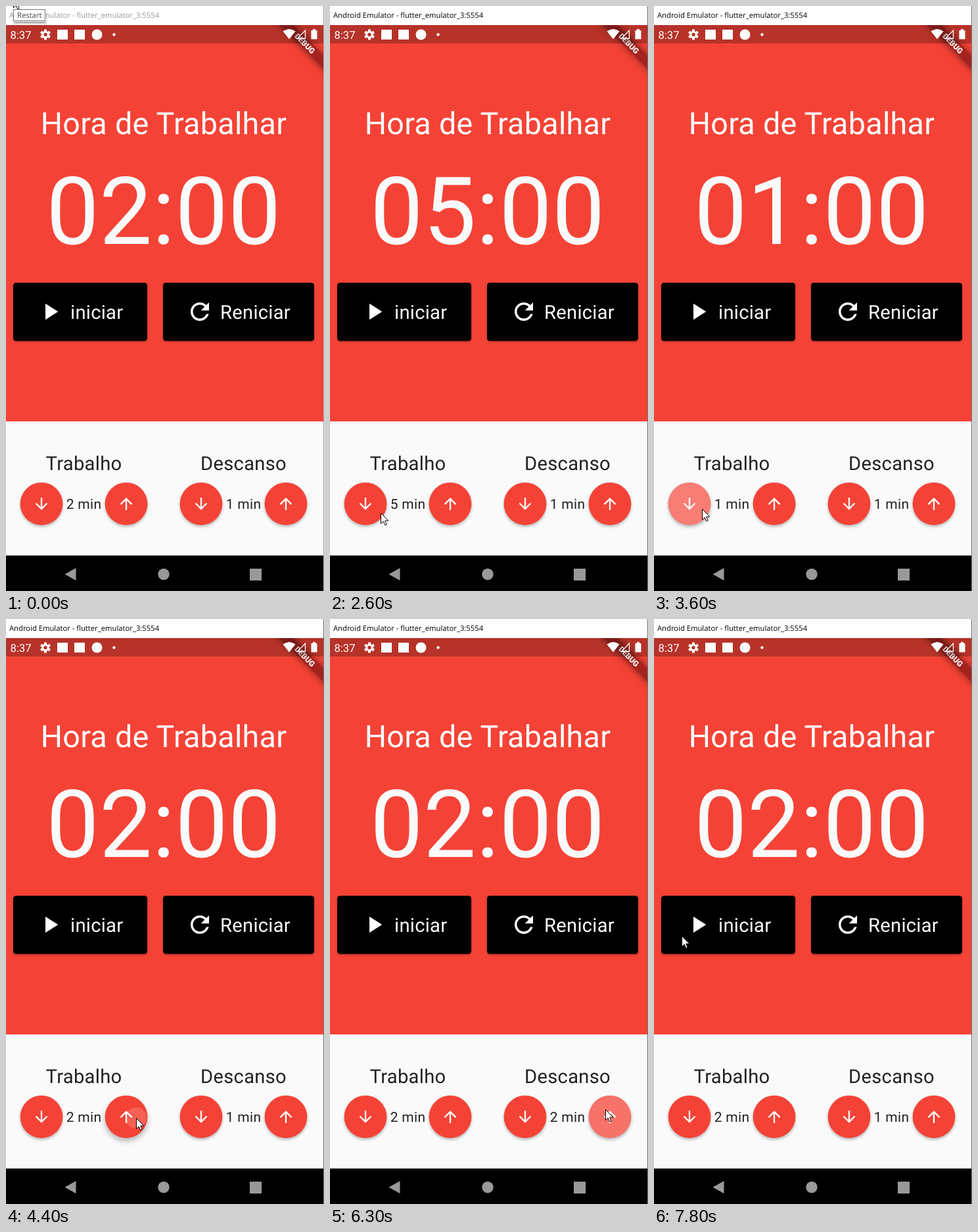
Animation of 484 by 890 pixels, one loop 8 s. Source, as an HTML page with a canvas:

```html
<!DOCTYPE html>
<html lang="pt">
<head>
<meta charset="utf-8">
<title>Timer</title>
<style>
html, body { margin: 0; width: 100%; height: 100%; overflow: hidden; background: #fff; }
canvas { display: block; width: 484px; height: 890px; }
</style>
</head>
<body>
<canvas id="stage" width="484" height="890"></canvas>
<script>
const ctx = document.getElementById('stage').getContext('2d');
const LOOP = 8000, STEP = 100;
const RED = '#f44336', INK = '#212121';
const UI = '"Open Sans", sans-serif', APP = 'Roboto, sans-serif';
const TRACK = .29;

const ICON = {
  play: new Path2D('M8 5v14l11-7z'),
  refresh: new Path2D('M17.65 6.35C16.2 4.9 14.21 4 12 4c-4.42 0-7.99 3.58-7.99 8s3.57 8 7.99 8c3.73 0 6.84-2.55 7.73-6h-2.08c-.82 2.33-3.04 4-5.65 4-3.31 0-6-2.69-6-6s2.69-6 6-6c1.66 0 3.14.69 4.22 1.78L13 11h7V4l-2.35 2.35z'),
  down: new Path2D('M20 12l-1.41-1.41L13 16.17V4h-2v12.17l-5.58-5.59L4 12l8 8 8-8z'),
  up: new Path2D('M4 12l1.41 1.41L11 7.83V20h2V7.83l5.58 5.59L20 12l-8-8-8 8z'),
  arrow: new Path2D('M.5.5V16.6L4.2 13.1L6.8 18.8L9.2 17.8L6.7 12.1H11.8Z')
};

// Round buttons: centre x, value they change, direction
const FABS = [
  { x: 54, key: 'work', dir: -1 }, { x: 183, key: 'work', dir: 1 },
  { x: 297, key: 'rest', dir: -1 }, { x: 426, key: 'rest', dir: 1 }
];
const FAB_Y = 757.3, FAB_R = 32.4;

// [time, button index]
const PRESSES = [
  [1900, 1], [2100, 1], [2300, 1], [3000, 0], [3200, 0], [3400, 0], [3500, 0],
  [4400, 1], [6200, 3], [6700, 3], [7000, 2], [7200, 2]
];
// Splash opacity and elevation by steps since the press
const SPLASH = [.16, .25, .08];
const LIFT = [12, 7, 6];

// Pointer path: [time, x, y]
const PATH = [
  [0, 11, -14], [800, 204, 779], [900, 193, 755], [1200, 184, 755], [2300, 184, 755],
  [2600, 77, 771], [2800, 73, 765], [3800, 73, 765], [4100, 198, 759], [4700, 198, 759],
  [5200, 308, 765], [5400, 428, 758], [5500, 428, 758], [6200, 419, 746], [6700, 419, 746],
  [7000, 317, 772], [7500, 317, 772], [7600, 308, 770], [7700, 308, 770], [7800, 42, 482]
];

function pointerAt(t) {
  const i = PATH.findIndex(p => p[0] > t);
  if (i < 0) return PATH[PATH.length - 1].slice(1);
  const [t0, x0, y0] = PATH[i - 1], [t1, x1, y1] = PATH[i];
  const k = (t - t0) / (t1 - t0);
  return [Math.round(x0 + (x1 - x0) * k), Math.round(y0 + (y1 - y0) * k)];
}

function rect(x, y, w, h, color) {
  ctx.fillStyle = color;
  ctx.fillRect(x, y, w, h);
}

function disc(x, y, r, color) {
  ctx.fillStyle = color;
  ctx.beginPath();
  ctx.arc(x, y, r, 0, 7);
  ctx.fill();
}

function poly(points, color) {
  ctx.fillStyle = color;
  ctx.beginPath();
  points.forEach(p => ctx.lineTo(p[0], p[1]));
  ctx.closePath();
  ctx.fill();
}

function text(str, x, y, font, color, align = 'left', spacing = 0) {
  ctx.font = font;
  ctx.textRendering = 'geometricPrecision';
  ctx.fillStyle = color;
  ctx.textAlign = align;
  ctx.letterSpacing = spacing + 'px';
  ctx.fillText(str, x, y);
}

function icon(path, x, y, scale, color) {
  ctx.save();
  ctx.translate(x, y);
  ctx.scale(scale, scale);
  ctx.fillStyle = color;
  ctx.fill(path);
  ctx.restore();
}

function withShadow(alpha, blur, dy, draw) {
  ctx.save();
  ctx.shadowColor = `rgba(0,0,0,${alpha})`;
  ctx.shadowBlur = blur;
  ctx.shadowOffsetY = dy;
  draw();
  ctx.restore();
}

function titleBar(active) {
  rect(0, 0, 484, 29, '#fff');
  text('Android Emulator - flutter_emulator_3:5554', 5, 18, '11.25px ' + UI, active ? '#000' : '#999');
}

function banner() {
  ctx.save();
  ctx.beginPath();
  ctx.rect(0, 29, 484, 603);
  ctx.clip();
  ctx.translate(483, 29);
  ctx.rotate(Math.PI / 4);
  withShadow(.5, 12, 0, () => rect(-60, 32.7, 120, 14, '#a02a23'));
  rect(-60, 32.7, 120, 14, '#a5231f');
  text('DEBUG', 0, 44, '900 11.9px ' + APP, '#fff', 'center');
  ctx.restore();
}

function gear(x, y) {
  disc(x, y, 5.8, '#fff');
  for (let i = 0; i < 6; i++) {
    ctx.save();
    ctx.translate(x, y);
    ctx.rotate(i * Math.PI / 3);
    rect(-2, -8, 4, 4, '#fff');
    ctx.restore();
  }
  disc(x, y, 2.7, '#b73228');
}

function statusBar() {
  rect(0, 29, 484, 28, 'rgba(0,0,0,.25)');
  text('8:37', 6.5, 49.5, '16.6px ' + APP, '#fff');
  gear(60, 43.5);
  rect(78, 36, 16, 15, '#fff');
  rect(104, 36, 16, 15, '#fff');
  disc(138.5, 43.5, 8, '#fff');
  disc(164.5, 43.5, 2.2, '#fff');

  ctx.fillStyle = '#fff';
  ctx.beginPath();
  ctx.moveTo(431, 50.5);
  ctx.lineTo(421.5, 38.5);
  ctx.quadraticCurveTo(431, 31.5, 440.5, 38.5);
  ctx.fill();

  ctx.strokeStyle = '#fff';
  ctx.lineWidth = 1.3;
  ctx.beginPath();
  ctx.moveTo(455.5, 37);
  ctx.lineTo(455.5, 49.5);
  ctx.lineTo(443.5, 49.5);
  ctx.closePath();
  ctx.stroke();

  rect(464.5, 37, 9, 13.5, '#fff');
  rect(467, 35, 4, 3, '#fff');
}

function blackButton(x, w, path, iconX, label, labelX) {
  withShadow(.3, 3, 1.5, () => {
    ctx.fillStyle = '#000';
    ctx.beginPath();
    ctx.roundRect(x, 421, w, 88.5, 4.5);
    ctx.fill();
  });
  icon(path, iconX, 444, 1.75, '#fff');
  text(label, labelX, 475.5, '29.17px ' + APP, '#fff', 'left', TRACK);
}

function fab(index, t) {
  const { x, dir } = FABS[index];
  const live = PRESSES
    .filter(p => p[1] === index && p[0] <= t)
    .map(p => ({ at: p[0], age: Math.round((t - p[0]) / STEP) }))
    .filter(p => p.age < SPLASH.length);
  const lift = Math.max(6, ...live.map(p => LIFT[p.age]));
  withShadow(.28, lift * .7, lift * .4, () => disc(x, FAB_Y, FAB_R, RED));

  ctx.save();
  ctx.beginPath();
  ctx.arc(x, FAB_Y, FAB_R, 0, 7);
  ctx.clip();
  for (const { at, age } of live) {
    const [px, py] = pointerAt(at);
    disc(px, py, age ? 70 : 16, `rgba(255,255,255,${SPLASH[age]})`);
  }
  ctx.restore();
  icon(dir > 0 ? ICON.up : ICON.down, x - 14, FAB_Y - 14, 1.1667, '#fff');
}

function counter(x, label, value) {
  text(label, x, 706, '29.17px ' + APP, INK, 'center', TRACK);
  text(value + ' min', x, 765, '21px ' + APP, INK, 'center', TRACK);
}

function navBar() {
  rect(0, 836, 484, 54, '#000');
  const gray = '#999';
  poly([[89.5, 864.5], [106.5, 855], [106.5, 874]], gray);
  disc(240, 864.5, 8.7, gray);
  rect(371, 856, 18, 18, gray);
}

function tooltip() {
  withShadow(.45, 3, 2, () => rect(12, 6, 49, 18, '#fff'));
  rect(11, 5, 49, 18, '#767676');
  rect(12, 6, 47, 16, '#fff');
  text('Restart', 17, 18, '11.25px ' + UI, '#444');
}

function pointer(t) {
  const [x, y] = pointerAt(t);
  ctx.save();
  ctx.translate(x, y);
  ctx.fillStyle = '#fff';
  ctx.strokeStyle = '#000';
  ctx.lineWidth = 1;
  ctx.fill(ICON.arrow);
  ctx.stroke(ICON.arrow);
  ctx.restore();
}

function draw(t) {
  const active = t >= 1500;
  const value = { work: 2, rest: 1 };
  for (const [at, i] of PRESSES) if (at <= t) value[FABS[i].key] += FABS[i].dir;

  titleBar(active);
  rect(0, 29, 484, 603, RED);
  text('Hora de Trabalhar', 240, 194.5, '46.67px ' + APP, '#fff', 'center', TRACK);
  text(`0${value.work}:00`, 240, 362, '143px ' + APP, '#fafafa', 'center', TRACK);
  blackButton(11, 204, ICON.play, 46, 'iniciar', 98);
  blackButton(239, 230, ICON.refresh, 274, 'Reniciar', 326);
  banner();
  statusBar();

  rect(0, 632, 484, 204, '#fafafa');
  rect(0, 833, 484, 3, '#fff');
  counter(118.5, 'Trabalho', value.work);
  counter(361.5, 'Descanso', value.rest);
  FABS.forEach((_, i) => fab(i, t));
  navBar();
  rect(483, 0, 1, 890, active ? '#707070' : '#aaa');

  if (t < 200) tooltip();
  pointer(t);
}

const start = performance.now();
function tick() {
  const t = (performance.now() - start) % LOOP;
  draw(Math.floor(t / STEP) * STEP);
  requestAnimationFrame(tick);
}
tick();
</script>
</body>
</html>
```
